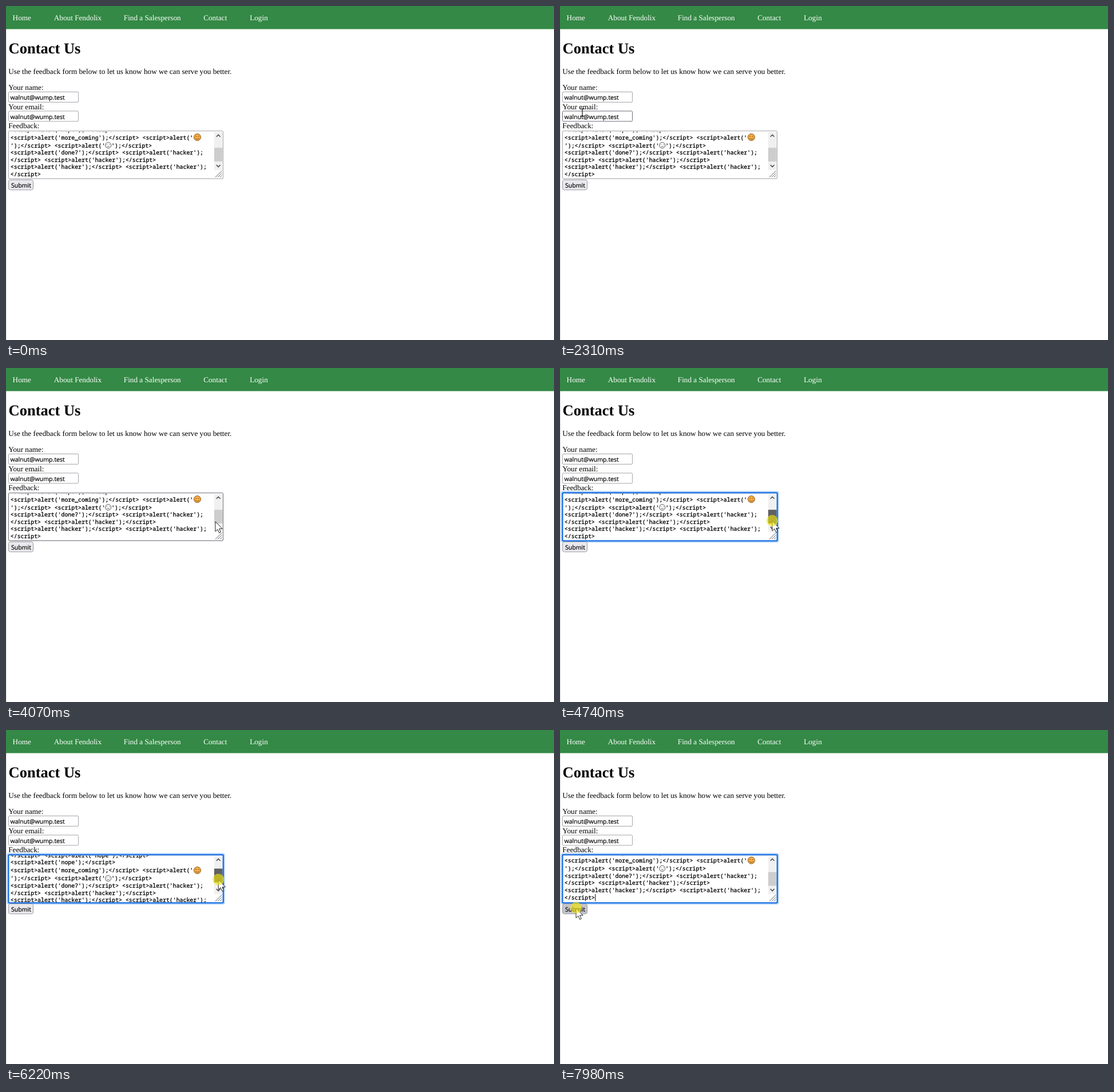
An HTML page that plays this animation: 958 px wide and 585 px high, repeating every 8000 ms.

```html
<!DOCTYPE html>
<html lang="en">
<head>
<meta charset="utf-8">
<title>Contact form</title>
<style>
  html, body { margin: 0; width: 100%; height: 100%; overflow: hidden; background: #fff; }
  svg { display: block; width: 100vw; height: 100vh; }
  text { white-space: pre; text-rendering: geometricPrecision; }
  .serif { font: 13.22px "Liberation Serif", serif; }
  .title { font: bold 26.5px "Liberation Serif", serif; }
  .ui { font: 10.6px "Open Sans", sans-serif; stroke: #000; stroke-width: .2; }
  .code { font: 500 9.87px "Noto Sans Mono", monospace; }
  .code text { stroke: #000; stroke-width: .3; }
  .field { fill: #fff; stroke: #a5a5ae; }
  .field.hover { stroke: #6c6c78; }
</style>
</head>
<body>
<svg viewBox="0 0 958 585" preserveAspectRatio="none">
  <defs>
    <clipPath id="inside"><rect x="6" y="220" width="358" height="82"/></clipPath>
  </defs>
  <path d="M.5 40V585" stroke="#dcdcdc"/>
  <rect width="958" height="40.5" fill="#338945"/>
  <g class="serif" fill="#fff">
    <text x="11.6" y="25">Home</text>
    <text x="83.8" y="25">About Fendolix</text>
    <text x="205.8" y="25">Find a Salesperson</text>
    <text x="345.2" y="25">Contact</text>
    <text x="426.2" y="25">Login</text>
  </g>
  <text class="title" x="4.5" y="82.8">Contact Us</text>
  <g class="serif">
    <text x="4.2" y="118.5">Use the feedback form below to let us know how we can serve you better.</text>
    <text x="4.2" y="147">Your name:</text>
    <text x="4.2" y="180.6">Your email:</text>
    <text x="4.2" y="214.3">Feedback:</text>
  </g>

  <rect id="name" class="field" x="4.5" y="150.5" width="122" height="18" rx="1.5"/>
  <rect id="email" class="field" x="4.5" y="184" width="122" height="18" rx="1.5"/>
  <rect id="area" class="field" x="4.5" y="218.8" width="375" height="83.7" rx="1.5"/>
  <g class="ui">
    <text x="7.4" y="164">walnut@wump.test</text>
    <text x="7.4" y="197.6">walnut@wump.test</text>
  </g>

  <g clip-path="url(#inside)">
    <g id="content" class="code">
      <g transform="translate(334.5 229.8)" fill="none" stroke="#6b4312" stroke-width=".9">
        <circle r="6" fill="#fbae42"/>
        <path d="M-3.4 -1q1.2 -2 2.4 0M1 -1q1.2 -2 2.4 0M-3.6 1.6Q0 5.4 3.6 1.6"/>
      </g>
      <g transform="translate(178.7 244)" fill="none" stroke="#444" stroke-width=".9">
        <circle r="5.1" fill="#fff"/>
        <path d="M-2.2 -2v1.4M2.2 -2v1.4M-2.2 2.5Q0 1.2 2.2 2.5"/>
      </g>
      <path id="caret" d="M61.8 288.8v12.4" stroke="#000"/>
    </g>
  </g>

  <rect x="364" y="221" width="14.5" height="66.5" fill="#f0f0f0"/>
  <rect id="thumb" x="364" width="14.5" height="24"/>
  <path d="M367.8 229l3.4 -3.4 3.4 3.4M367.8 278.4l3.4 3.4 3.4 -3.4" fill="none" stroke="#505050" stroke-width="1.6"/>
  <path d="M366 300l11.5 -11.5M370 300l7.5 -7.5M374 300l3.5 -3.5" stroke="#666"/>

  <g id="focus" fill="none" stroke-width="2">
    <rect x="2.4" y="216.4" width="379.4" height="88.4" rx="3" stroke="#b4d5fb"/>
    <rect x="4.4" y="218.4" width="375.4" height="84.4" rx="1.5" stroke="#0060df"/>
  </g>

  <rect id="button" x="4.5" y="304.5" width="43" height="17.5" rx="3" stroke="#9a9aa4"/>
  <text class="ui" x="8.9" y="317.7">Submit</text>

  <g id="pointer">
    <path id="arrow" d="M0 0V17.2L4 13.6L6.6 19.8L9.3 18.6L6.8 12.6H12.2Z" fill="#fff" stroke="#111" stroke-width=".9"/>
    <path id="beam" d="M-3.5 -6.5H3.5M0 -6.5V6.5M-3.5 6.5H3.5" fill="none" stroke="#000" stroke-width="1.1"/>
    <circle id="press" cy="-.8" r="10" fill="#f0e40c"/>
  </g>
</svg>
<script>
const LOOP = 8000;
const LINE_HEIGHT = 12.65;
const EMOJI_EXTRA = 1.35;
const ADVANCE = 5.922;
const $ = id => document.getElementById(id);

function addText(string, x, y) {
  const node = document.createElementNS('http://www.w3.org/2000/svg', 'text');
  node.setAttribute('x', x);
  node.setAttribute('y', y);
  node.textContent = string;
  $('content').append(node);
}

// Wrapped feedback text; "@" leaves room for an emoji.
const alerts = ['hacker', 'gotcha', 'nope', 'nope', 'more_coming', '@', '@', 'done?',
  'hacker', 'hacker', 'hacker', 'hacker'];
const feedback = alerts.map(word => `<script>alert('${word}');<\/script>`).join(' ')
  .replace(/(gotcha'\);|done\?'\);<\/script> <script>alert\('hacker'\);)/, '$1\n')
  .replace(/(nope'\);<\/script>) /g, '$1\n')
  .replace(/@/, '@\n')
  .replace(/(@'\);<\/script>) (?=<script>alert\('done)/, '$1\n')
  .replace(/(done.*?hacker'\);)/, '$1\n')
  .replace(/(\n<\/script> <script>alert\('hacker'\);<\/script>) /, '$1\n')
  .replace(/<\/script>$/, '\n$&');

let baseline = 194.2 - LINE_HEIGHT;
for (const line of feedback.split('\n')) {
  baseline += LINE_HEIGHT + (line.includes('@') ? EMOJI_EXTRA : 0);
  const [before, after] = line.split('@');
  addText(before, 7.8, baseline);
  if (after) addText(after, 7.8 + before.length * ADVANCE + 10.6, baseline);
}

// Pointer moves: start, end, destination. It rests between them.
const entry = { x: 668, y: 501 };
const moves = [
  [840, 960, 248, 334],
  [1220, 1630, 35, 200],
  [1630, 1970, 38, 156],
  [2040, 2850, 41, 247],
  [2850, 3600, 325, 284],
  [3670, 4070, 366, 269],
  [4070, 4340, 371, 268],
  [5320, 5820, 371, 254],
  [6040, 6640, 372, 282],
  [6970, 7580, 28, 312]
];

function pointerAt(t) {
  let { x, y } = entry;
  for (const [start, end, toX, toY] of moves) {
    const k = Math.min(1, Math.max(0, (t - start) / (end - start)));
    x += (toX - x) * k;
    y += (toY - y) * k;
  }
  return [x, y];
}

const within = (v, from, to) => v >= from && v < to;
const show = (id, on) => $(id).setAttribute('visibility', on ? 'visible' : 'hidden');

function draw(t) {
  const [x, y] = pointerAt(t);
  const dragging = within(t, 4600, 6780);
  const submitting = t >= 7850;

  const over = (right, top, bottom) => within(x, 4, right) && within(y, top, bottom);
  const onName = over(127, 150, 169);
  const onEmail = over(127, 184, 202.5);
  const onArea = over(380, 219, 303);
  const onButton = over(48, 304, 322);
  $('name').classList.toggle('hover', onName);
  $('email').classList.toggle('hover', onEmail);
  $('area').classList.toggle('hover', onArea);
  $('button').setAttribute('fill', submitting ? '#c4c4cb' : onButton ? '#d0d0d7' : '#e9e9ed');

  const thumbY = t < 5320 ? 248.3 : t < 6640 ? Math.min(y - 19.7, 248.8) : 248.8;
  const onThumb = within(t, 4140, 4600);
  $('thumb').setAttribute('y', thumbY);
  $('thumb').setAttribute('fill', dragging ? '#606060' : onThumb ? '#a6a6a6' : '#cdcdcd');
  $('content').setAttribute('transform', `translate(0 ${(248.3 - thumbY) * 2.87})`);

  show('focus', t >= 4600);
  show('caret', within(t, 6780, 7280) || submitting);

  const beam = onName || onEmail || (onArea && x < 364);
  show('beam', beam);
  show('arrow', !beam && t >= 840);
  $('pointer').setAttribute('transform', `translate(${x} ${y})`);

  const pressed = t - (submitting ? 7850 : 4600);
  show('press', dragging || submitting);
  $('press').setAttribute('opacity', Math.min(0.65, 0.4 + pressed / 500));
}

function tick() {
  draw(performance.now() % LOOP);
  requestAnimationFrame(tick);
}
tick();
</script>
</body>
</html>
```
